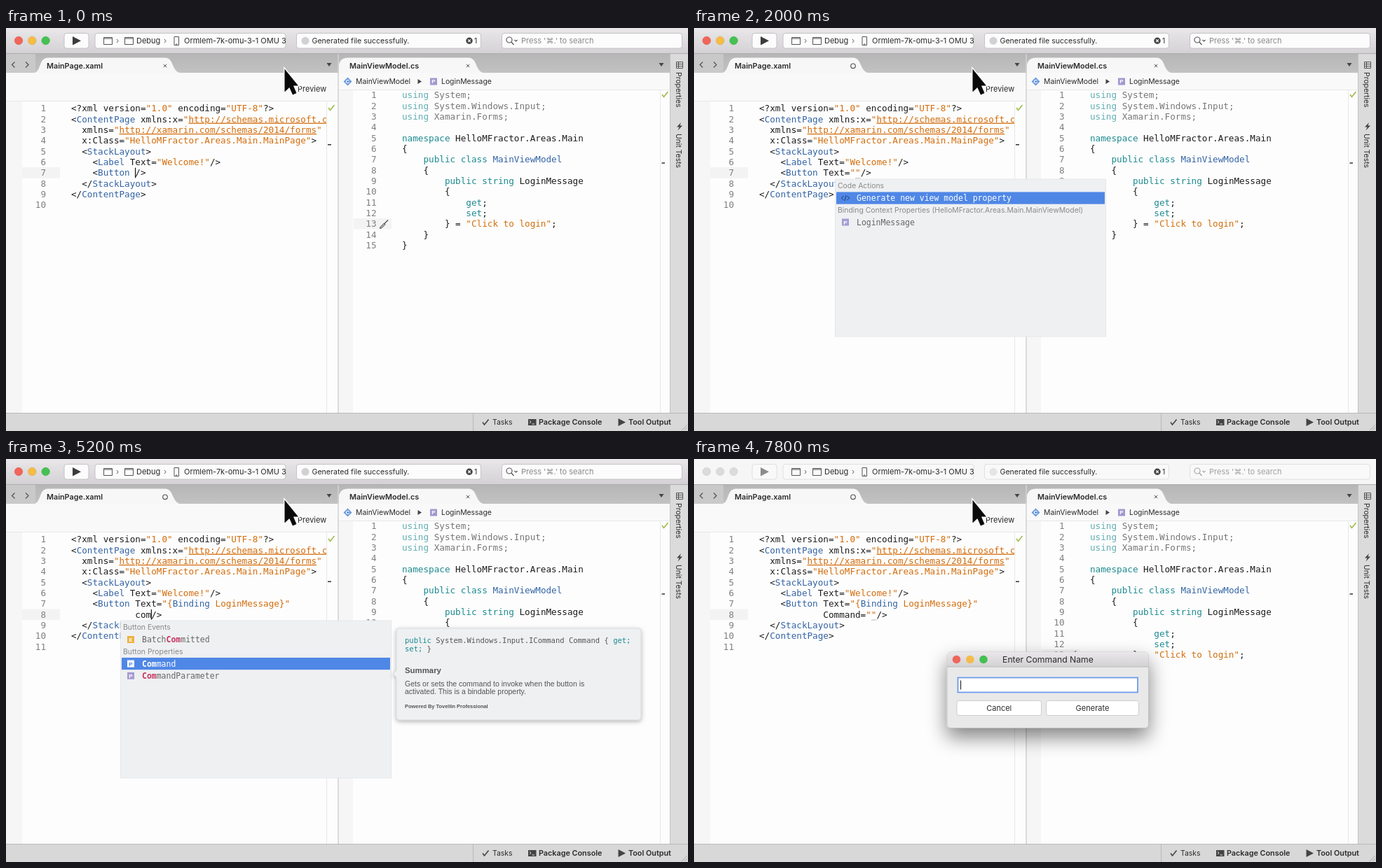
Recreate the animation shown at these times as an HTML page. Size 973x576 px, loop 8000 ms.

```html
<!DOCTYPE html>
<html lang="en">
<head>
<meta charset="utf-8">
<title>Editor</title>
<style>
html, body { margin: 0; height: 100%; overflow: hidden; background: #fdfdfd; }
svg { display: block; width: 100vw; height: 100vh; --bar: url(#toolbar); --field: #fcfcfc; --edge: #c4c2c4; --play: #3c3c3c; --lens: #555; }
svg.idle { --bar: #f6f6f6; --field: #f9f9f9; --edge: #e0e0e0; --play: #8c8c8c; --lens: #a4a4a4; }
text { font: 10.4px Inter, "Open Sans", sans-serif; fill: #2b2b2b; white-space: pre; }
.mono { font: 12.65px "DejaVu Sans Mono", monospace; }
.mono .k { fill: #1c1c1c; }
.mono .b { fill: #3364a4; }
.mono .o { fill: #d36d0c; }
.mono .u { fill: #d36d0c; text-decoration: underline; }
.mono .t { fill: #1b8a90; }
.mono .d { fill: #62aeb3; }
.mono .g { fill: #777; }
.num { fill: #808080; text-anchor: end; }
.bold { font-weight: 600; font-size: 10.8px; }
.ui { font-size: 11px; }
.item { font-size: 11.47px; fill: #666; }
.item.on { fill: #fff; }
.hit { fill: #c8365f; font-weight: bold; }
.on .hit { fill: #fff; }
.head { fill: #8a8a8a; }
.idle .search { fill: #a0a0a0; }
.tip { font: 10.5px "Liberation Sans", Arial, sans-serif; fill: #555; }
.tip.mono { font: 10.5px "DejaVu Sans Mono", monospace; }
.tip.title { font-weight: bold; font-size: 11.4px; }
.tip.foot { font-weight: bold; font-size: 7.43px; }
.badge { font: bold 8px "Liberation Sans", sans-serif; text-anchor: middle; fill: #fff; }
.field { fill: var(--field); stroke: var(--edge); }
.bar { fill: var(--bar); }
.line { fill: none; stroke: #555; }
.idle .light { fill: #dbdbdb; stroke: #cfcfcf; }
.idle .mark { opacity: .5; }
.mid { text-anchor: middle; }
</style>
</head>
<body>
<svg viewBox="0 0 973 576" preserveAspectRatio="none">
  <defs>
    <linearGradient id="toolbar" x2="0" y2="1"><stop stop-color="#e9e7e9"/><stop offset="1" stop-color="#d3d1d3"/></linearGradient>
    <linearGradient id="tabs" x2="0" y2="1"><stop stop-color="#b7b6b7"/><stop offset="1" stop-color="#c3c2c3"/></linearGradient>
    <filter id="soft" x="-20%" y="-20%" width="140%" height="150%"><feDropShadow dx="0" dy="2" stdDeviation="3" flood-opacity=".3"/></filter>
    <filter id="deep" x="-30%" y="-40%" width="160%" height="220%"><feDropShadow dx="0" dy="13" stdDeviation="14" flood-opacity=".48"/></filter>
    <clipPath id="device"><path d="M127 0H399V36H127z"/></clipPath>
    <clipPath id="page"><path d="M0 105H457V550H0z"/></clipPath>
    <path id="cross" class="line" d="M-2.2-2.2L2.2 2.2M2.2-2.2L-2.2 2.2"/>
    <path id="down" d="M-3.5-2H3.5L0 3z" fill="#444"/>
    <path id="tick" d="M-4 0L-1.5 3.5L4.5-4" fill="none" stroke-width="1.6"/>
  </defs>

  <!-- Toolbar -->
  <rect width="973" height="576" fill="#fdfdfd"/>
  <rect class="bar" width="973" height="37"/>
  <g stroke-width=".6">
    <circle class="light" cx="18" cy="18" r="5.7" fill="#f2655a" stroke="#d9544a"/>
    <circle class="light" cx="37.3" cy="18" r="5.7" fill="#f6bd45" stroke="#dba339"/>
    <circle class="light" cx="56.6" cy="18" r="5.7" fill="#45c152" stroke="#38a843"/>
  </g>
  <rect class="field" x="83" y="7.5" width="35" height="21.5" rx="3.5"/>
  <path d="M95 12L107 18.3L95 24.5z" style="fill:var(--play)"/>
  <rect class="field" x="127" y="7.5" width="272" height="21.5" rx="3.5"/>
  <path class="line" d="M139.5 13.5h12v10h-12zM139.5 15h12M169.5 13.5h12v10h-12zM169.5 15h12M158 16l2 2.5l-2 2.5M226 16l2 2.5l-2 2.5M240 12.5h6.5v12h-6.5zM242 23h2.5"/>
  <text class="ui" x="186" y="22.3">Debug</text>
  <g clip-path="url(#device)"><text class="ui" x="254" y="22.3">Ormlem-7k-omu-3-1 OMU 3.1</text></g>
  <rect class="field" x="414.5" y="7.5" width="263" height="21.5" rx="3.5"/>
  <circle class="mark" cx="427" cy="18.3" r="5.5" fill="#d2d0d4"/>
  <text x="436.5" y="22.3" style="font-size:10.6px">Generated file successfully.</text>
  <circle cx="661" cy="18.3" r="4.7" fill="#444"/>
  <path d="M659.2 16.5l3.6 3.6m0-3.6l-3.6 3.6" stroke="#fff" stroke-width="1.2"/>
  <text x="668" y="22.3">1</text>
  <rect class="field" x="707.5" y="7.5" width="257" height="21.5" rx="3.5"/>
  <g fill="none" stroke-width="1.2" style="stroke:var(--lens)"><circle cx="718" cy="17" r="4"/><path d="M721 20l3.5 4M725.5 17l2 2l2-2"/></g>
  <text class="ui head search" x="735" y="22.3">Press '⌘.' to search</text>

  <!-- Tabs -->
  <rect y="37" width="947" height="27" fill="url(#tabs)"/>
  <path d="M0 36.5H973" stroke="#aeadae"/>
  <path d="M0 37H42V64H0z" fill="#cac9ca"/>
  <path d="M39 64.5C51 63 46 42.5 60 42.5H227C240 42.5 236 63 250 64.5zM475 64.5V52C477 46 480 42.5 488 42.5H660C673 42.5 669 63 683 64.5z" fill="#f7f7f7"/>
  <path class="line" d="M12.5 48.5L8.5 52.5L12.5 56.5M28 48.5L32 52.5L28 56.5" stroke-width="1.3"/>
  <text class="bold" x="58" y="57.8">MainPage.xaml</text>
  <text class="bold" x="490" y="57.8">MainViewModel.cs</text>
  <use href="#cross" x="659" y="54"/>
  <use href="#down" x="461" y="52"/>
  <use href="#down" x="935" y="52"/>

  <!-- Left pane -->
  <path d="M0 64H473V105H0z" fill="#f9f9f9"/>
  <path d="M0 105H23V550H0z" fill="#f6f6f6"/>
  <path d="M0 104.5H473M457.5 105V550" fill="none" stroke="#e8e8e8"/>
  <text class="ui" x="416" y="91">Preview</text>
  <use href="#tick" x="464" y="114" stroke="#9fba4c"/>

  <!-- Right pane -->
  <path d="M475 64H947V88H475z" fill="#f9f9f9"/>
  <path d="M475 88H495V550H475z" fill="#f6f6f6"/>
  <path d="M475 88.5H947M933.5 88V550" fill="none" stroke="#e8e8e8"/>
  <path d="M474 37V550" stroke="#d2d2d2" stroke-width="1.6"/>
  <path d="M487.5 70.5L493.5 76.5L487.5 82.5L481.5 76.5z" fill="#6c9be0"/>
  <text class="badge" x="487.5" y="79.2">C</text>
  <text x="499" y="80.4">MainViewModel</text>
  <path d="M587.5 73L593 76.5L587.5 80z" fill="#444"/>
  <rect x="605" y="71.5" width="10" height="10" fill="#a297cf"/>
  <text class="badge" x="610" y="79.4">P</text>
  <text x="621" y="80.4">LoginMessage</text>
  <use href="#tick" x="940" y="95" stroke="#9fba4c"/>
  <path d="M935.5 193H940" stroke="#333" stroke-width="1.5"/>
  <path d="M496 272H550V287.5H496z" fill="#f3f3f3"/>
  <path d="M545 274.5L538.5 281" stroke="#555" stroke-width="1.5"/>
  <path d="M539.5 279L534 284.5L533.5 286.5L536 285.8L541 280.8z" fill="#bbb" stroke="#444"/>
  <g id="model"></g>

  <!-- Side and status bars -->
  <path d="M947 37H973V551H947z" fill="#dcdbdc"/>
  <path d="M947.5 37V550" stroke="#c2c2c2"/>
  <path class="line" d="M956.5 48.5h9v9h-9zM956.5 51.5h9M956.5 54.5h9M959.5 48.5v9"/>
  <text transform="translate(956 63) rotate(90)">Properties</text>
  <path d="M963 135L957 141.5H960.5L958.5 146.5L965 139.5H961.5z" fill="#444"/>
  <text transform="translate(956 151) rotate(90)">Unit Tests</text>
  <path d="M0 550H973V576H0z" fill="#d9d8d9"/>
  <path d="M0 550.5H973M666.5 550V576" stroke="#b9b9b9"/>
  <use href="#tick" x="684" y="563.5" stroke="#444"/>
  <text x="694" y="567.3">Tasks</text>
  <path d="M745 559H756.5V568H745z" fill="#444"/>
  <path d="M747 561l2 2l-2 2M750.5 566h3.5" fill="none" stroke="#ddd"/>
  <text class="bold" x="760" y="567.3">Package Console</text>
  <path d="M873.5 558L884 563.5L873.5 569z" fill="#444"/>
  <text class="bold" x="888" y="567.3">Tool Output</text>
  <path d="M964 575L972 567M968 575L972 571" stroke="#aaa"/>

  <g id="live"></g>
  <path d="M397.5 58.5V91.5L404.3 85L409 95.5L414.5 93L410 82.5H417z" fill="#0a0a0a" stroke="#fff" stroke-width="2.6" paint-order="stroke"/>
</svg>
<script>
const LOOP = 8000, STEP = 200, CHAR = 7.615, LEAD = 15.32, ROW = 17.25;
const $ = s => document.querySelector(s);
const esc = s => s.replace(/&/g, '&amp;').replace(/</g, '&lt;');
const text = (x, y, s, cls = '') => `<text class="${cls}" x="${x}" y="${y}">${s}</text>`;
const rect = (x, y, w, h, attrs) => `<rect x="${x}" y="${y}" width="${w}" height="${h}" ${attrs}/>`;

// Segments are split by "|"; the first letter of each names its colour.
const paint = line => line.split('|').map(s => `<tspan class="${s[0]}">${esc(s.slice(1))}</tspan>`).join('');
const code = (lines, x, y, numX) => lines.map((line, i) => {
  const at = y + i * LEAD;
  return text(numX, at, i + 1, 'mono num') + (line ? text(x, at, paint(line), 'mono') : '');
}).join('');

const model = [
  'dusing |gSystem;', 'dusing |gSystem.Windows.Input;', 'dusing |gXamarin.Forms;', '',
  'tnamespace |kHelloMFractor.Areas.Main', 'k{',
  't    public class |bMainViewModel', 'k    {',
  't        public string |kLoginMessage', 'k        {',
  't            get|k;', 't            set|k;',
  'k        } = |o"Click to login"|k;', 'k    }', 'k}'];
const pageTop = [
  'k<?xml version=|o"1.0"|k encoding=|o"UTF-8"|k?>',
  'k<|bContentPage|k xmlns:x=|o"|uhttp://schemas.microsoft.com/winfx/2009/xaml|o"',
  'k  xmlns=|o"|uhttp://xamarin.com/schemas/2014/forms|o"',
  'k  x:Class=|o"HelloMFractor.Areas.Main.MainPage"|k>',
  'k  <|bStackLayout|k>',
  'k    <|bLabel|k Text=|o"Welcome!"|k/>'];
const pageEnd = ['k  </|bStackLayout|k>', 'k</|bContentPage|k>', ''];
const bound = 'kText=|o"{|bBinding|o LoginMessage}"';
$('#model').innerHTML = code(model, 565, 100.4, 528.5);

// Popup entries: h heading, a action, p property, e event.
const context = 'hBinding Context Properties (HelloMFractor.Areas.Main.MainViewModel)';
const newProperty = 'aGenerate new view model property';
const textActions = { x: 201.5, y: 216, items: ['hCode Actions', newProperty, context, 'pLoginMessage'] };
const textNames = { x: 163.5, y: 216, items: ['hButton Properties', 'pText', 'pTextColor'] };
const commandNames = { x: 163.5, y: 231,
  items: ['hButton Events', 'eBatchCommitted', 'hButton Properties', 'pCommand', 'pCommandParameter'] };
const commandActions = { x: 223.5, y: 231,
  items: ['hCode Actions', newProperty, 'aGenerate view model command', context, 'pLoginMessage'] };

const foot = 'Powered By Tovellin Professional';
const commandTip = () => balloon(557, 242, 349, 131, 307) +
  text(569, 263.3, '<tspan class="t">public</tspan> System.Windows.Input.ICommand Command { <tspan class="t">get;</tspan>', 'tip mono') +
  text(569, 275.3, '<tspan class="t">set;</tspan> }', 'tip mono') +
  text(569, 306, 'Summary', 'tip title') +
  text(569, 324.6, 'Gets or sets the command to invoke when the button is', 'tip') +
  text(569, 336.2, 'activated. This is a bindable property.', 'tip') +
  text(569, 355.6, foot, 'tip foot');
const propertyTip = () => balloon(617, 231, 301, 82, 257) +
  ['Generate a new property in', 'HelloMFractor.Areas.Main.MainViewModel and reference it', 'with a XAML data-binding.']
    .map((s, i) => text(629, 253.8 + i * 11.6, s, 'tip')).join('') +
  text(629, 296.4, foot, 'tip foot');

const textEmpty = 'kText=|o""', commandEmpty = 'kCommand=|o""';
const outline = popup => ({ ...popup, sel: 1, outline: true });
const pick = (popup, sel, hit) => ({ ...popup, sel, hit });

// "edit" is the moment the caret blink restarts.
const scenes = [
  { at: 0, attr: 'k', col: 12, edit: 0 },
  { at: 600, attr: 'kt', col: 13, edit: 600, popup: pick(textNames, 1, 'T') },
  { at: 800, attr: 'kte', col: 14, edit: 800, popup: pick(textNames, 1, 'Te') },
  { at: 1000, attr: textEmpty, col: 18, edit: 1200, popup: outline(textActions) },
  { at: 1800, attr: textEmpty, col: 18, edit: 1200, popup: pick(textActions, 1), mark: 18 },
  { at: 2400, attr: textEmpty, col: 18, edit: 2400, popup: pick(textActions, 3), mark: 18 },
  { at: 2800, attr: bound, col: 40, edit: 2800, mark: 40 },
  { at: 3200, split: true, attr: 'k', col: 12, edit: 3200, mark: 40 },
  { at: 4600, split: true, attr: 'kc', col: 13, edit: 4600, popup: pick(commandNames, 3, 'C') },
  { at: 4800, split: true, attr: 'kco', col: 14, edit: 4800, popup: pick(commandNames, 3, 'Co') },
  { at: 5000, split: true, attr: 'kcom', col: 15, edit: 5000, popup: pick(commandNames, 3, 'Com') },
  { at: 5200, split: true, attr: 'kcom', col: 15, edit: 5000, popup: pick(commandNames, 3, 'Com'), tip: commandTip },
  { at: 5600, split: true, attr: commandEmpty, col: 21, edit: 5800, popup: outline(commandActions) },
  { at: 5800, split: true, attr: commandEmpty, col: 21, edit: 5800, popup: outline(commandActions), tip: propertyTip },
  { at: 6400, split: true, attr: commandEmpty, col: 21, edit: 5800, popup: pick(commandActions, 1), tip: propertyTip },
  { at: 6800, split: true, attr: commandEmpty, col: 21, edit: 5800, popup: pick(commandActions, 2), mark: 21 },
  { at: 7400, split: true, attr: commandEmpty, mark: 21, dialog: true }];

function balloon(x, y, w, h, tipY) {
  return `<path filter="url(#soft)" fill="#eef0f2" stroke="#c9cbce" stroke-width=".6" d="M${x + 4} ${y}h${w - 8}q4 0 4 4v${h - 8}q0 4-4 4h${8 - w}q-4 0-4-4V${tipY + 5}l-5-5l5-5V${y + 4}q0-4 4-4z"/>`;
}

function icon(kind, x, y, on) {
  if (kind === 'a')
    return `<path d="M${x - 2.5} ${y - 3}l-3 3l3 3m5-6l3 3l-3 3m-1.5-7l-2 8" fill="none" stroke="${on ? '#223a66' : '#777'}"/>`;
  const tone = kind === 'e' ? '#eeb13a' : '#a79cd3';
  return rect(x - 5, y - 5, 10, 10, `fill="${on ? '#fff' : tone}"`) +
    `<text class="badge" x="${x}" y="${y + 3}" ${on ? 'style="fill:#4f87e6"' : ''}>${kind.toUpperCase()}</text>`;
}

function drawPopup({ x, y, items, sel, hit, outline }) {
  return rect(x, y, 386, 225, 'fill="#eef0f2" stroke="#e1e3e6" stroke-width=".8"') + items.map((entry, i) => {
    const kind = entry[0], label = entry.slice(1), mid = y + 9.8 + i * ROW;
    if (kind === 'h') return text(x + 3.5, mid + 3.6, label, 'head');
    const on = i === sel && !outline;
    const frame = i !== sel ? '' : outline
      ? rect(x + 2, mid - 8, 382, 16, 'fill="#f1f3f6" stroke="#6485c4" stroke-width="1.6"')
      : rect(x + 1.5, mid - 8.6, 383, 17.2, 'fill="#4f87e6"');
    const shown = hit ? label.replace(hit, `<tspan class="hit">${hit}</tspan>`) : label;
    return frame + icon(kind, x + 14.5, mid, on) + text(x + 30.5, mid + 4, shown, 'mono item' + (on ? ' on' : ''));
  }).join('');
}

function drawDialog() {
  const dot = (x, tone) => `<circle cx="${x}" cy="286.5" r="5.8" fill="${tone}"/>`;
  const button = (x, w, label) => rect(x, 345.5, w, 21, 'rx="3" fill="#fff" stroke="#cdcdcd"') +
    text(x + w / 2, 360.3, label, 'ui mid');
  return rect(361, 276, 287.5, 108.5, 'rx="5" fill="#e9e9e9" stroke="#b5b5b5" stroke-width=".7" filter="url(#deep)"') +
    '<path d="M361 297V281q0-5 5-5H643.5q5 0 5 5V297z" fill="url(#toolbar)"/><path d="M361 297H648.5" stroke="#b8b8b8"/>' +
    dot(374.5, '#ee675c') + dot(393.8, '#f4bc4a') + dot(413, '#44bf51') +
    '<text class="mid" x="505" y="291" style="font-size:12.2px">Enter Command Name</text>' +
    rect(376.5, 312.5, 256.5, 21, 'fill="#fff" stroke="#6e9be8" stroke-width="1.8"') +
    rect(380, 316.5, 1.1, 13, 'fill="#222"') +
    button(375, 120.5, 'Cancel') + button(502.5, 132, 'Generate');
}

function draw(t) {
  const s = scenes.findLast(scene => scene.at <= t);
  const row = s.split ? 7 : 6, top = 119.3, y = top + row * LEAD;
  const button = 'k    <|bButton|k |';
  const lines = [...pageTop,
    ...(s.split ? [button + bound, 'k            |' + s.attr + '|k/>'] : [button + s.attr + '|k/>']),
    ...pageEnd];
  const blink = (t - s.edit + LOOP) % 1000 < 500;
  const underY = top + (s.mark === 40 ? 6 : row) * LEAD + 3;
  $('svg').classList.toggle('idle', !!s.dialog);
  $('#live').innerHTML =
    rect(23, y - 12, 54, 15.5, 'fill="#f3f3f3"') +
    `<g clip-path="url(#page)">${code(lines, 93, top, 57)}</g>` +
    (s.mark ? rect(93 + s.mark * CHAR, underY, 7.5, 1, 'fill="#bbb"') : '') +
    (s.col && blink ? rect(92.6 + s.col * CHAR, y - 11.5, 1.2, 14.5, 'fill="#111"') : '') +
    rect(459, s.split ? 174.5 : 166, 5, 1.5, 'fill="#333"') +
    (t < 600 ? '<use href="#cross" x="227" y="54"/>' : '<circle class="line" cx="227" cy="54.3" r="3.3" stroke-width="1.2"/>') +
    (s.popup ? drawPopup(s.popup) : '') +
    (s.tip ? s.tip() : '') +
    (s.dialog ? drawDialog() : '');
}

let shown = -1;
function tick() {
  const step = Math.floor(performance.now() % LOOP / STEP);
  if (step !== shown) draw((shown = step) * STEP);
  requestAnimationFrame(tick);
}
tick();
</script>
</body>
</html>
```
